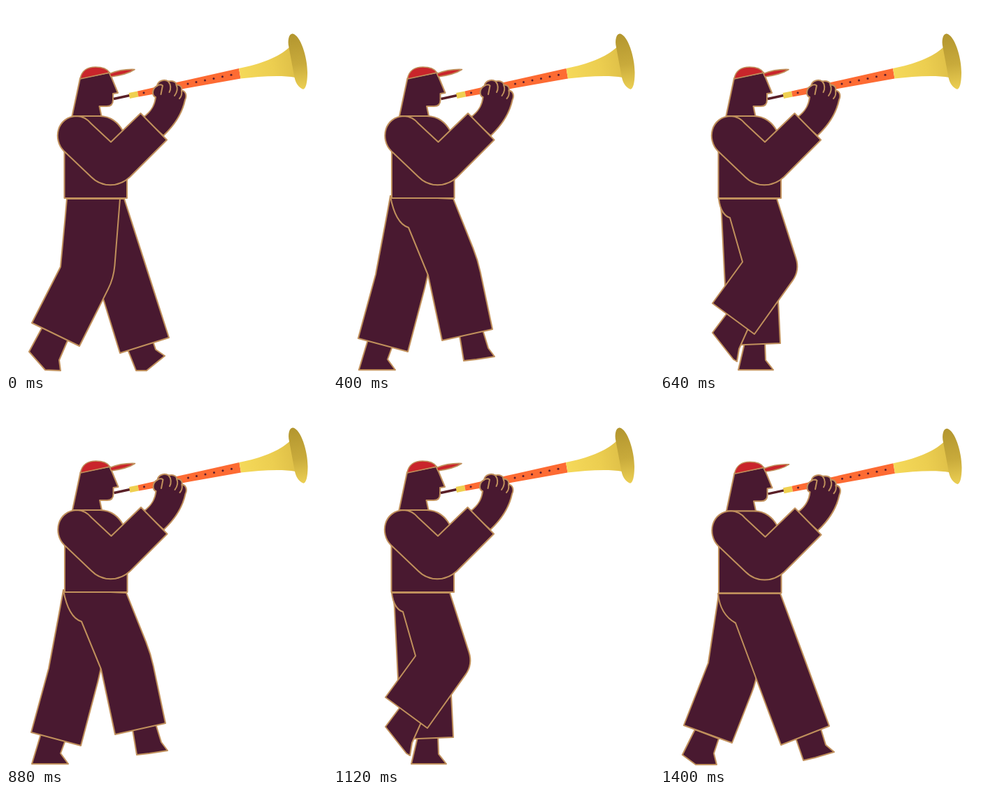
These frames come from a looping animation (459x522 px, 1.44 s). An HTML page:

```html
<!DOCTYPE html>
<html lang="en">
<head>
<meta charset="utf-8">
<title>Marching horn player</title>
<style>
  html, body { margin: 0; width: 100%; height: 100%; overflow: hidden; background: #fff; }
  svg { display: block; width: 459px; height: 522px; }
  .skin { fill: #491930; stroke: #c0905c; stroke-width: 2; stroke-linejoin: round; stroke-linecap: round; }
  .line { fill: none; }
  .cap { fill: #c9252b; stroke: #c0905c; stroke-width: 1.6; stroke-linejoin: round; }
</style>
</head>
<body>
<svg viewBox="0 0 459 522">
  <defs>
    <linearGradient id="brass" gradientUnits="userSpaceOnUse" x1="334" y1="97" x2="412" y2="80">
      <stop offset="0" stop-color="#f5d95a"/>
      <stop offset=".6" stop-color="#ecce50"/>
      <stop offset="1" stop-color="#dfc048"/>
    </linearGradient>
    <linearGradient id="mouth" gradientUnits="userSpaceOnUse" x1="412" y1="40" x2="423" y2="118">
      <stop offset="0" stop-color="#b3962f"/>
      <stop offset=".55" stop-color="#c8aa3b"/>
      <stop offset="1" stop-color="#ebce52"/>
    </linearGradient>
  </defs>
  <g id="far"><path class="skin"/><path class="skin"/></g>
  <g id="near"><path class="skin"/><path class="skin"/></g>
  <g id="body">
    <path class="skin" d="M83.5 274V190L98 157H134C150 157 161 167 167 178L173 200V274Z"/>
    <path class="skin" d="M106 103L94.500 157H136.500L133.500 143H144C151 143 153 139 153 134V125L160 124L148 95Z"/>
    <path class="cap" d="M106 104C108 92 117 87 128 87C139 87 145 90 148 95Z"/>
    <path class="cap" d="M148 96.500C159 92 171 90 184 90.500C176 96 164 99 150 101Z"/>
    <path d="M154 132.500L177 127.500" stroke="#5a2028" stroke-width="3.400"/>
    <path d="M175.500 124L188 121.500L189.500 129.500L177 132Z" fill="#efd050"/>
    <path d="M188 121.500L333 89L335.500 103.500L189.500 129.500Z" fill="#fd6b33"/>
    <g id="holes" fill="#5a1c2c"></g>
    <path fill="url(#brass)" d="M333 89C364 83 390 73 405 59L418 75L414 102C390 98 361 101 335.500 103.500Z"/>
    <path fill="url(#mouth)" d="M404.500 59C402 48 405 39 410 39.500C421 42 431 72 431 95C431 111 428 120 424 118.500C418 116 414 109 412.500 102Z"/>
    <path class="skin" d="M196 159C210 149 213 139 214 130C208 128 209 117 216 114C217 106 227 104 232 107.500C239 106 244 109 243.500 112.500C250 112 252 117 251 120.500C257 121 259 128 256 134C252 153 241 170 225 185Z"/>
    <path class="skin line" d="M216 114C219 112 222 112 224 113.500L221.500 126M232 107.500C236 112 236 119 233.500 123M243.500 112.500C246 118 244 124 241 128M251 120.500C252 126 251 129 248 132"/>
    <path class="skin" d="M101 157C111 157 117 162 122 168L150 194L192.500 153L230 191L177 244C161 259 137 259 122 244L83 207C66 190 73 158 101 157Z"/>
  </g>
</svg>
<script>
const STEP = 40, LOOP = 480, CYCLE = 2 * LOOP;
const HIP = [125, 275], FLOOR = 520;
const times = [0, 160, 400, 440, 480, 640, 880, 920];

// Hip back, seat bulge, seat, knee back, cuff back, cuff front, knee front, hip front.
const trousers = [
  [87,275, 86,286, 85,298, 78,372, 37,452, 105,485, 154,388, 163,275],
  [84,275, 87,298, 100,302, 118,365, 75,424, 135,468, 200,377, 167,275],
  [82,271, 89,310, 108,316, 136,384, 156,477, 228,461, 207,362, 172,275],
  [83,276, 86,306, 108,318, 140,404, 173,492, 242,465, 207,370, 172,276],
  [95,275, 100,290, 105,305, 132,395, 163,495, 233,473, 201,374, 169,275],
  [86,275, 87,285, 88,297, 93,398, 98,484, 172,481, 168,400, 163,275],
  [82,271, 79,288, 76,304, 61,383, 36,474, 107,493, 136,384, 150,275],
  [84,277, 81,296, 78,316, 69,375, 34,464, 103,489, 138,400, 150,276]
];
// Ankle back, heel, ball, toe, instep, ankle front.
const feet = [
  [52,458, 33,493, 56,519, 78,520, 76,505, 89,475],
  [96,438, 75,466, 105,504, 110,507, 113,489, 126,460],
  [181,470, 187,506, 205,504, 231,500, 222,488, 214,462],
  [194,482, 205,514, 222,510, 249,502, 237,492, 229,466],
  [174,490, 186,520, 201,520, 227,499, 214,490, 210,478],
  [121,481, 112,519, 135,519, 162,519, 151,505, 150,480],
  [50,476, 37,519, 60,519, 89,519, 78,504, 85,485],
  [50,470, 32,506, 51,520, 81,520, 77,504, 84,483]
];

// Poses swing about the hip, so they are blended as angle and radius.
const toPolar = pose => {
  const out = [];
  for (let i = 0; i < pose.length; i += 2) {
    const x = pose[i] - HIP[0], y = pose[i + 1] - HIP[1];
    out.push(Math.atan2(x, y), Math.hypot(x, y));
  }
  return out;
};
const legTrack = trousers.map(toPolar), footTrack = feet.map(toPolar);

const n = times.length;
const wrap = i => (i + n) % n;
const gap = i => (times[wrap(i + 1)] - times[wrap(i)] + CYCLE) % CYCLE;

// Periodic cubic with limited slopes, so nothing overshoots.
function blend(track, t) {
  let k = n - 1;
  while (times[k] > t) k--;
  const h = gap(k), u = (t - times[k]) / h;
  return track[k].map((a, c) => {
    const secant = i => (track[wrap(i + 1)][c] - track[wrap(i)][c]) / gap(i);
    const slope = i => {
      const p = secant(i - 1), q = secant(i);
      return p * q > 0 ? 2 * p * q / (p + q) : 0;
    };
    const b = track[wrap(k + 1)][c], v = 1 - u;
    return a * (1 + 2 * u) * v * v + b * u * u * (3 - 2 * u)
      + h * u * v * (v * slope(k) - u * slope(k + 1));
  });
}

function points(track, t) {
  const p = blend(track, t), out = [];
  for (let i = 0; i < p.length; i += 2)
    out.push([HIP[0] + p[i + 1] * Math.sin(p[i]), Math.min(FLOOR, HIP[1] + p[i + 1] * Math.cos(p[i]))]);
  return out;
}

const at = p => p[0].toFixed(2) + " " + p[1].toFixed(2);
const toward = (p, q, d) => {
  const f = d / Math.hypot(q[0] - p[0], q[1] - p[1]);
  return [p[0] + (q[0] - p[0]) * f, p[1] + (q[1] - p[1]) * f];
};

function drawLeg(id, t) {
  const [foot, leg] = document.getElementById(id).children;
  foot.setAttribute("d", "M" + points(footTrack, t).map(at).join("L") + "Z");
  const [hipB, bulge, seat, kneeB, cuffB, cuffF, kneeF, hipF] = points(legTrack, t);
  leg.setAttribute("d",
    `M${at(hipB)}Q${at(bulge)} ${at(seat)}L${at(kneeB)}L${at(cuffB)}L${at(cuffF)}` +
    `L${at(toward(kneeF, cuffF, 18))}Q${at(kneeF)} ${at(toward(kneeF, hipF, 18))}L${at(hipF)}Z`);
}

document.getElementById("holes").innerHTML =
  [197, 260, 272, 284.5, 297, 309.5, 322]
    .map(x => `<circle cx="${x}" cy="${123.8 - (x - 197) * 0.204}" r="1.5"/>`).join("");

const body = document.getElementById("body");
const start = performance.now();
function frame(now) {
  const t = Math.floor(Math.max(0, now - start) / STEP) * STEP % LOOP;
  drawLeg("far", t + LOOP);
  drawLeg("near", t);
  const dip = Math.max(0, 1 - Math.abs(t - 440) / STEP);
  body.setAttribute("transform", `translate(${t >= 400 ? 0.5 : 0} ${1.3 * dip})`);
  requestAnimationFrame(frame);
}
frame(start);
</script>
</body>
</html>
```
